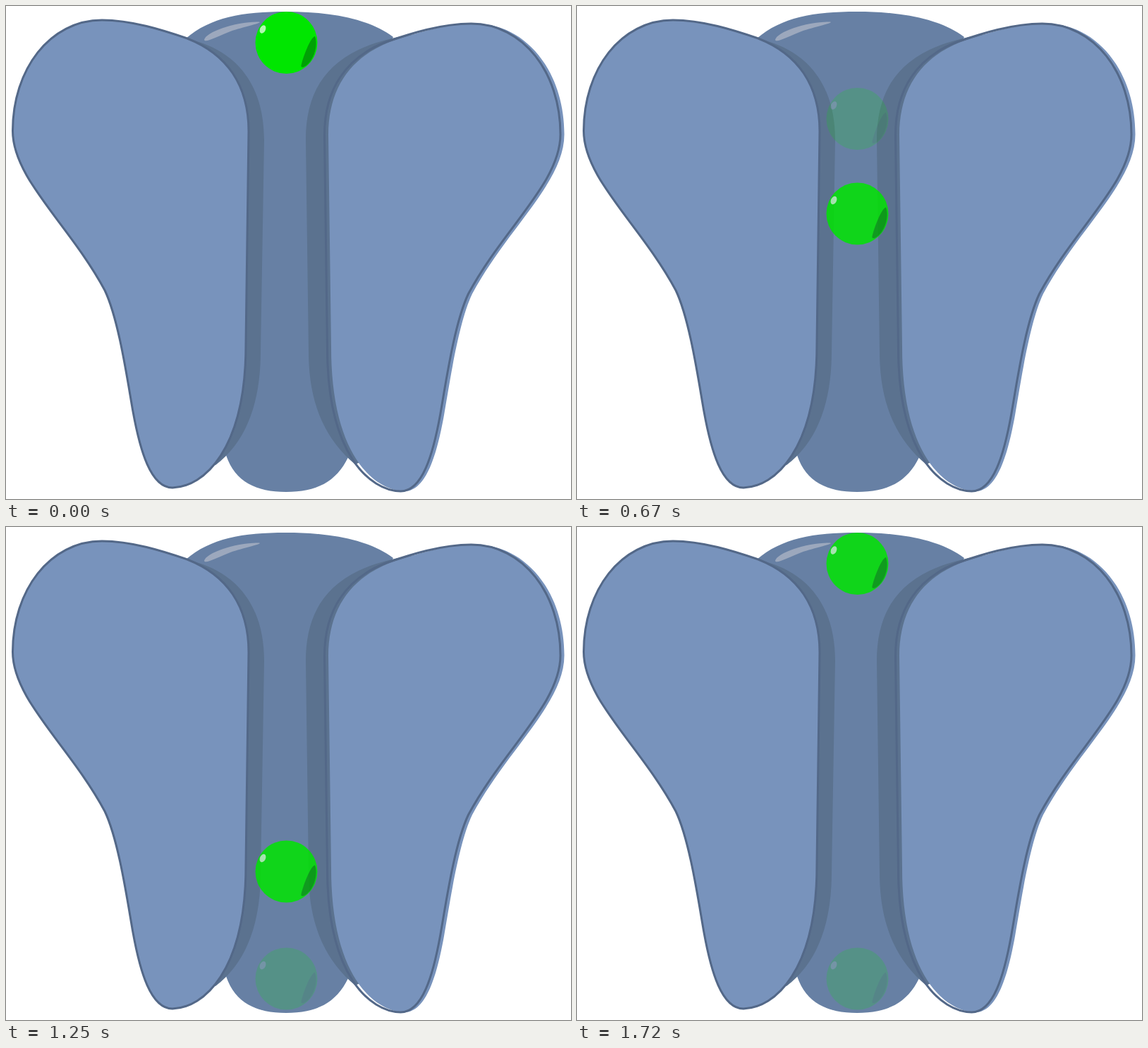
Animation of 801 by 699 pixels, one loop 1750 ms. Source, as an HTML page:

```html
<!DOCTYPE html>
<html lang="en">
<head>
<meta charset="utf-8">
<title>Ball moving down a groove</title>
<style>
html, body { margin: 0; width: 100%; height: 100%; overflow: hidden; background: #fff; }
svg { display: block; }
</style>
</head>
<body>
<svg width="801" height="699" viewBox="0 0 801 699">
  <defs>
    <path id="wing" d="M136 20C178 20 222 34 257 46C313 68 344 112 344 178L340 480C340 630 280 682 236 683C205 683 190 630 180 575C172 530 160 445 140 403C90 310 9.500 245 9.500 177C9.500 90 62 20 136 20Z"/>
    <g id="ball">
      <circle r="44" fill="#00e600"/>
      <ellipse rx="4" ry="6" transform="translate(-33.500 -19) rotate(25)" fill="#b3f7b3"/>
      <path d="M40.500 -9C44 0 42 14 35 25C29 34 20 38 21 32C23 22 34 -8 40.500 -9Z" fill="#00a105"/>
    </g>
  </defs>

  <!-- body -->
  <path fill="#6780a4" d="M255 46C290 16 335 8 397 8C460 8 515 18 549 44L470 180V600L485 640C468 675 440 689 397 689C355 689 325 675 312 637L330 600V180Z"/>
  <path fill="#9ca8bd" d="M281 48C283 37 325 22 358 22.500C368 23 335 30 318 36C300 43 282 53 281 48Z"/>

  <!-- groove shadows -->
  <g fill="#5b728f">
    <path d="M255 46C330 62 366 115 366 190L361 490C361 560 342 617 297 651L280 640V80Z"/>
    <path d="M580 40C470 55 425 105 425 190L429 490C429 560 450 612 495 650L506 645L520 80Z"/>
  </g>

  <!-- wings -->
  <use href="#wing" fill="#7893bc" stroke="#536888" stroke-width="3"/>
  <use href="#wing" fill="#7893bc" transform="matrix(-1 0 0 1 801 5)"/>
  <use href="#wing" fill="none" stroke="#536888" stroke-width="3" transform="matrix(-1 0 0 1 795.500 5)"/>

  <use id="from" href="#ball"/>
  <use id="to" href="#ball"/>
</svg>
<script>
const stops = [52, 160, 294.5, 488.5, 640.5];
const HOLD = 200, STEP = 30, STEPS = 5;
const PERIOD = HOLD + STEP * STEPS;
const from = document.getElementById('from');
const to = document.getElementById('to');

function place(ball, stop, opacity) {
  ball.setAttribute('transform', `translate(397.5 ${stops[stop % stops.length]})`);
  ball.setAttribute('opacity', opacity);
}

function draw() {
  const time = performance.now() % (PERIOD * stops.length);
  const stop = Math.floor(time / PERIOD);
  const step = Math.floor((time % PERIOD - HOLD) / STEP) + 1;
  const fade = Math.max(0, step) / (STEPS + 1);
  place(from, stop, 1 - fade);
  place(to, stop + 1, fade);
  requestAnimationFrame(draw);
}
draw();
</script>
</body>
</html>
```
